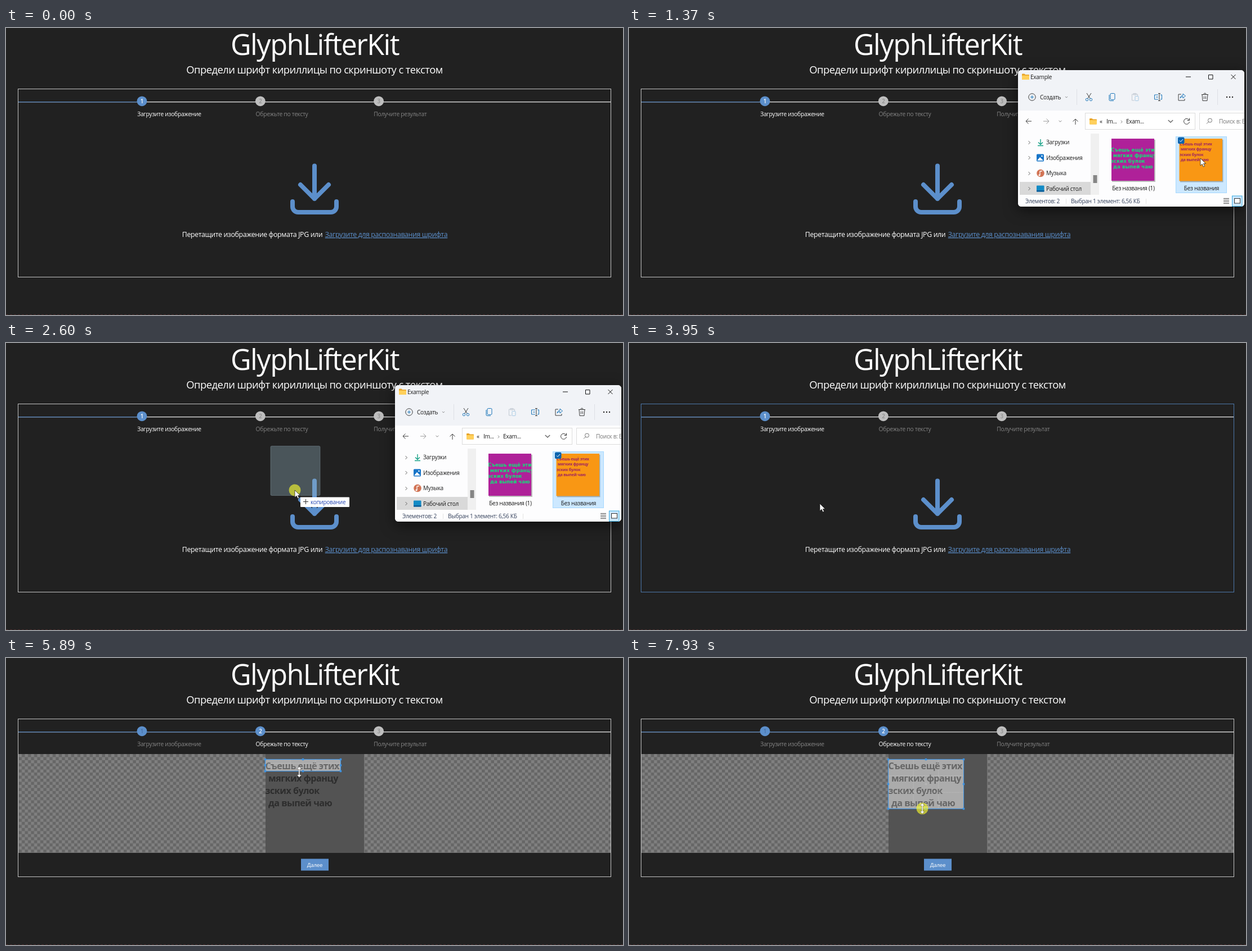
Write an HTML page that moves like this. It is 1096 by 511 pixels and loops after 8 s.

```html
<!DOCTYPE html>
<html lang="ru">
<head>
<meta charset="utf-8">
<title>Определение шрифта</title>
<style>
html, body { margin: 0; width: 100%; height: 100%; overflow: hidden; background: #212121; }
svg { display: block; width: 1096px; height: 511px; }
text { font-family: "Open Sans", "Noto Sans", sans-serif; letter-spacing: -.03em; }
.mid { text-anchor: middle; }
.label { font-size: 10.3px; }
.num { font-size: 9.8px; font-weight: 600; text-anchor: middle; }
.ui { font-size: 10.1px; fill: #1b1b1b; }
.line { fill: none; stroke: #3c3c3c; }
.blue { fill: none; stroke: #1874b8; }
.wide { font: bold 8.7px "DejaVu Sans", sans-serif; letter-spacing: 0; }
#win { filter: drop-shadow(0 6px 12px rgba(0,0,0,.55)); }
</style>
</head>
<body>
<svg viewBox="0 0 1096 511">
<defs>
  <pattern id="check" x="22.5" y="171" width="10.968" height="10.968" patternUnits="userSpaceOnUse">
    <path d="M0 0H10.968V10.968H0z" fill="#666"/>
    <path d="M0 0H5.484V10.968H10.968V5.484H0z" fill="#808080"/>
  </pattern>
  <clipPath id="winClip"><rect width="402" height="243" rx="6"/></clipPath>
  <clipPath id="picClip"><rect x="166" y="122" width="76" height="75"/></clipPath>
  <clipPath id="cropClip"><rect class="cropRect" x="460.5" y="180.5" width="134"/></clipPath>

  <g id="words" font-size="16.15" font-weight="700">
    <text x="460.5" y="198">Съешь ещё этих</text>
    <text x="466" y="220">мягких францу</text>
    <text x="460.5" y="242">зских булок</text>
    <text x="466" y="264">да выпей чаю</text>
  </g>

  <g id="folder">
    <path d="M0 1.5Q0 .5 1 .5H4.5L6 2H12Q13 2 13 3V10Q13 11 12 11H1Q0 11 0 10z" fill="#e8a427"/>
    <path d="M0 4.2Q0 3.4 1 3.4H12Q13 3.4 13 4.2V10Q13 11 12 11H1Q0 11 0 10z" fill="#ffd05b"/>
  </g>
  <path id="down" d="M-3-1.5 0 1.5 3-1.5" fill="none" stroke="#666"/>
  <path id="right" d="M-1.5-3 1.5 0-1.5 3" fill="none" stroke="#666"/>

  <g id="face" clip-path="url(#winClip)">
    <rect width="402" height="243" fill="#fdfdfe"/>
    <rect width="402" height="72" fill="#f1f3f7"/>
    <use href="#folder" x="7" y="6"/>
    <text class="ui" x="22" y="16">Example</text>
    <path class="line" style="stroke:#111" d="M298 12H307M338.5 8.5H346V16H338.5zM378.5 8 386.5 16M386.5 8 378.5 16"/>

    <!-- toolbar -->
    <g transform="translate(25 48)" class="line"><circle r="6.2"/><path class="blue" d="M-3 0H3M0-3V3"/></g>
    <text class="ui" x="39" y="52">Создать</text>
    <use href="#down" transform="translate(86 48) scale(.7)"/>
    <path d="M104.5 34V62M354.5 34V62" stroke="#dde0e6"/>
    <g transform="translate(126 48)" class="line"><path d="M-4-7 2.5 3M4-7-2.5 3"/><g class="blue"><circle cx="-3.5" cy="4.5" r="2.2"/><circle cx="3.5" cy="4.5" r="2.2"/></g></g>
    <g transform="translate(167 48)" class="blue"><rect x="-3" y="-6.5" width="8" height="11" rx="1.5"/><path d="M-5-4V5Q-5 6.5-3 6.5H3"/></g>
    <g transform="translate(208 48)" fill="none" stroke="#c3cad3"><path d="M-1 6H-5.5V-5H4.5V-2M-3-6.5H2V-4H-3z"/><rect x="0" y="-1.5" width="6" height="8" rx="1" stroke="#a9cbe5"/></g>
    <g transform="translate(249 48)" class="blue"><path d="M0-4H-6.5V4H0M4-4H6.5V4H4M-4 0H0"/><path class="line" d="M2-6.5V6.5M0-6.5H4M0 6.5H4"/></g>
    <g transform="translate(291 48)" class="blue"><path class="line" d="M-1-5H-6V6H5V3"/><path d="M-3 2Q-2-3 2-3V-6L6.5-2 2 2V-1Q-1-1-3 2z"/></g>
    <path transform="translate(332 48)" class="line" d="M-6-4.5H6M-2-4.5Q-2-7 0-7T2-4.5M-5-4.5-4 6.5H4L5-4.5M-1.5-1.5V3.5M1.5-1.5V3.5"/>
    <g fill="#222"><circle cx="371" cy="48" r="1.2"/><circle cx="376" cy="48" r="1.2"/><circle cx="381" cy="48" r="1.2"/></g>

    <!-- address row -->
    <path class="line" d="M24 91H14M18.5 86.5 14 91 18.5 95.5M102 97V87M97.5 91.5 102 87 106.5 91.5"/>
    <path fill="none" stroke="#999" d="M45 91H55M50.5 86.5 55 91 50.5 95.5"/>
    <use href="#down" transform="translate(75 91) scale(.8)"/>
    <g fill="#fff" stroke="#dcdcdc"><rect x="119.5" y="76.5" width="195" height="29"/><rect x="322.5" y="76.5" width="100" height="29"/></g>
    <use href="#folder" x="127" y="85.5"/>
    <text class="ui" x="145" y="94.5">«</text>
    <text class="ui" x="157" y="95">Im...</text>
    <use href="#right" transform="translate(184 92) scale(.8)"/>
    <text class="ui" x="192" y="95">Exam...</text>
    <use href="#down" transform="translate(271 91) scale(1.4)"/>
    <path class="line" d="M304 89A5 5 0 1 0 304.5 92M304.5 85.5V89.5H300.5"/>
    <g class="line" stroke-opacity=".7"><circle cx="341" cy="89.5" r="3.5"/><path d="M338.5 92 335 95.5"/></g>
    <text class="ui" x="357" y="95" style="fill:#777">Поиск в: Example</text>

    <!-- side list -->
    <rect x="3" y="199" width="126" height="23" fill="#d9d9d9"/>
    <use href="#right" x="20" y="129"/><use href="#right" x="20" y="156"/><use href="#right" x="20" y="184"/><use href="#right" x="20" y="211"/>
    <path d="M40 123V132M36 128.5 40 132.5 44 128.5M35 134.5H45" fill="none" stroke="#14a085" stroke-width="1.4"/>
    <rect x="33" y="149.5" width="13" height="13" rx="1.5" fill="#1775c8"/><path d="M34 161 39 155 45 161z" fill="#fff"/><circle cx="42.5" cy="153" r="1.3" fill="#fff"/>
    <circle cx="40" cy="183.5" r="6.8" fill="#d27455"/><path d="M39 187V180L43 179.5" fill="none" stroke="#fff" stroke-width="1.3"/><circle cx="38" cy="187" r="1.6" fill="#fff"/>
    <rect x="33" y="205.5" width="13.5" height="11" rx="1" fill="#138bc6"/><path d="M33 214H46.5V216.5H33z" fill="#0d5c98"/>
    <text class="ui" x="50" y="132">Загрузки</text>
    <text class="ui" x="50" y="159.5">Изображения</text>
    <text class="ui" x="50" y="187">Музыка</text>
    <text class="ui" x="50" y="214.5">Рабочий стол</text>
    <rect x="129" y="113" width="15" height="109" fill="#f0f0f0"/>
    <rect x="133.5" y="187" width="7" height="14" fill="#858585"/>

    <!-- files -->
    <rect x="167" y="124" width="77" height="75" fill="#bbb"/>
    <rect x="166" y="122" width="76" height="75" fill="#af2199"/>
    <g clip-path="url(#picClip)" fill="#12e178">
      <text class="wide" x="165" y="144.5">Съешь ещё этих</text>
      <text class="wide" x="169" y="154.5">мягких францу</text>
      <text class="wide" x="165" y="164.5">зских булок</text>
      <text class="wide" x="169" y="174.5">да выпей чаю</text>
    </g>
    <text class="ui mid" x="205" y="213.5">Без названия (1)</text>
    <rect x="280.5" y="118.5" width="90" height="100" fill="#cce8ff" stroke="#a5d8ff"/>
    <rect x="288" y="124" width="76.5" height="75.5" fill="#9ab0bd"/>
    <rect x="286.5" y="122" width="76.5" height="75.5" fill="#f99714"/>
    <g fill="#a0265f" font-size="7.1" font-weight="700">
      <text x="287" y="133.5">Съешь ещё этих</text>
      <text x="289" y="143">мягких францу</text>
      <text x="287" y="152.5">зских булок</text>
      <text x="289" y="162">да выпей чаю</text>
    </g>
    <rect x="284" y="119.5" width="11.5" height="11.5" rx="2" fill="#0b63ad"/>
    <path d="M287 125.5 289 127.5 293 123" fill="none" stroke="#fff"/>
    <text class="ui mid" x="326" y="213.5">Без названия</text>

    <!-- status row -->
    <rect y="222.5" width="402" height="21" fill="#fdfdfe"/>
    <text class="ui" x="13" y="237" style="fill:#35425c">Элементов: 2</text>
    <text class="ui" x="94" y="237" style="fill:#35425c">Выбран 1 элемент: 6,56 КБ</text>
    <path d="M85.5 229V238M227.5 229V238" stroke="#e3e3e3"/>
    <path d="M365 228.5H375M365 231.5H375M365 234.5H375M365 237.5H375" stroke="#444"/>
    <rect x="380.5" y="224" width="17.5" height="18.5" fill="#cce8ff" stroke="#39a9df"/>
    <rect x="384.5" y="228.5" width="10" height="8.5" fill="#fff" stroke="#333"/>
  </g>
</defs>

<rect width="1096" height="511" fill="#212121"/>
<path d="M0 510.5H1096" stroke="#4b2f2f" stroke-dasharray="4 3"/>
<g fill="#fff">
  <text class="mid" x="548.5" y="48" font-size="50.3">GlyphLifterKit</text>
  <text class="mid" x="548" y="81" font-size="18.4" font-weight="500">Определи шрифт кириллицы по скриншоту с текстом</text>
</g>

<g id="upload">
  <g fill="none" stroke="#5c8fcb" stroke-width="8" stroke-linecap="round" stroke-linejoin="round">
    <path d="M548 245.5V304M523 279 548 304 573 279"/>
    <path d="M509 309V318A10 10 0 0 0 519 328H577A10 10 0 0 0 587 318V309"/>
  </g>
  <g font-size="12.35" font-weight="500">
    <text class="mid" x="437.5" y="372" fill="#fff">Перетащите изображение формата JPG или</text>
    <text class="mid" x="675.5" y="372" fill="#5c8fcb" text-decoration="underline">Загрузите для распознавания шрифта</text>
  </g>
</g>

<g id="crop">
  <rect x="22" y="171" width="1052" height="176" fill="url(#check)"/>
  <rect x="461" y="171" width="175" height="176" fill="#535353"/>
  <use href="#words" fill="#2d2d2d"/>
  <g clip-path="url(#cropClip)">
    <rect x="460" y="171" width="176" height="176" fill="#ababab"/>
    <use href="#words" fill="#666"/>
  </g>
  <path id="thirds" fill="none" stroke="#eee" stroke-opacity=".4" stroke-width=".7" stroke-dasharray="1.5 1"/>
  <rect class="cropRect" x="460.5" y="180.5" width="134" fill="none" stroke="#3f92e0" stroke-width="1.1"/>
  <path id="knobs" fill="#3f92e0"/>
  <rect x="524" y="357.5" width="49" height="21" fill="#5c8fcb"/>
  <text class="mid" x="548.5" y="371.5" font-size="9.8" font-weight="500" fill="#fff">Далее</text>
</g>

<rect id="frame" x="21.5" y="108.5" width="1053" fill="none"/>
<rect x="22" y="131" width="1052" height="1.3" fill="#e6e6e6"/>
<rect id="bar" x="22" y="131" height="1.3" fill="#4f7bb0"/>
<g id="steps"></g>

<g id="preview">
  <rect x="400" y="364" width="175" height="134" rx="6" fill="#f1f3f7"/>
  <use href="#folder" x="412" y="373"/>
  <text class="ui" x="430" y="383">Example</text>
  <path class="line" d="M556 375 563 382M563 375 556 382"/>
  <use href="#face" transform="translate(412 394) scale(.376)"/>
</g>
<use id="win" href="#face"/>

<g id="ghost">
  <rect x="-43" y="-78.5" width="88" height="88" rx="2" fill="#96b4c3" fill-opacity=".35" stroke="#a5c0cc" stroke-opacity=".3"/>
  <g id="hint">
    <rect x="10" y="12.5" width="87" height="17.5" rx="1" fill="#fff"/>
    <path d="M15 20.5H24M19.5 16V25" stroke="#333"/>
    <text x="28" y="24.5" font-size="10.05" fill="#2748b4">копирование</text>
  </g>
</g>
<circle id="press" r="10.5" fill="#fcff2c" fill-opacity=".62"/>
<path id="arrow" d="M0 0V13L3.2 10.2 5.2 15 7.6 14 5.5 9.4H9.5z" fill="#fff" stroke="#111" stroke-width=".7"/>
<g id="cross" fill="none"><path d="M-9 0H9M0-9V9" stroke="#222" stroke-width="2.4" stroke-opacity=".5"/><path d="M-8.5 0H8.5M0-8.5V8.5" stroke="#fff" stroke-width="1.1"/></g>
<path id="resize" d="M0-9.5 4-5H1V5H4L0 9.5-4 5H-1V-5H-4z" fill="#fff" stroke="#222" stroke-width=".6" stroke-opacity=".6"/>
</svg>

<script>
const LOOP = 8000, BLUE = "#5c8fcb";
const $ = id => document.getElementById(id);
const set = (el, attrs) => { for (const k in attrs) el.setAttribute(k, attrs[k]); };
const show = (id, on) => { $(id).style.display = on ? "" : "none"; };
const place = (id, x, y, s = 1) => set($(id), { transform: `translate(${x} ${y}) scale(${s})` });
const mix = (a, b, p) => a + (b - a) * p;
const smooth = p => p * p * (3 - 2 * p);
const easeOut = p => 1 - (1 - p) ** 2;

// share of n even jumps done at time t, the first at a and the last at b
function jumps(t, a, b, n) {
  if (t < a) return 0;
  return Math.min(n, Math.floor((t - a) / (b - a) * (n - 1) + 1e-6) + 1) / n;
}

const steps = ["Загрузите изображение", "Обрежьте по тексту", "Получите результат"].map((name, i) => {
  const x = 241.5 + i * 210.3, mid = [290, 490, 700.3][i];
  const g = document.createElementNS("http://www.w3.org/2000/svg", "g");
  g.innerHTML = `<circle cx="${x}" cy="130.3" r="8.9"/>
    <text class="num" x="${x}" y="134">${i + 1}</text>
    <text class="label mid" x="${mid}" y="157">${name}</text>`;
  $("steps").append(g);
  return g.children;
});

function drawSteps(now) {
  steps.forEach(([dot, num, label], i) => {
    set(dot, { fill: i <= now ? BLUE : "#bebebe" });
    set(num, { fill: i === now ? "#fff" : i < now ? "#466fa5" : "#8d8d8d" });
    set(label, { fill: i === now ? "#fff" : "#848484" });
  });
  set($("bar"), { width: 211 + now * 210.3 });
}

function drawCrop(bottom) {
  const left = 460.5, right = 594.5, top = 180.5, w = right - left, h = bottom - top;
  const cx = left + w / 2, cy = top + h / 2;
  for (const el of document.querySelectorAll(".cropRect")) set(el, { height: h });
  let grid = `M${cx - 2} ${cy}h4M${cx} ${cy - 2}v4`;
  for (const k of [1 / 3, 2 / 3])
    grid += `M${left + w * k} ${top}v${h}M${left} ${top + h * k}h${w}`;
  set($("thirds"), { d: grid });
  let d = "";
  for (const x of [left, cx, right])
    for (const y of [top, cy, bottom])
      if (x !== cx || y !== cy) d += `M${x - 1.7} ${y - 1.7}h3.4v3.4h-3.4z`;
  set($("knobs"), { d });
}

function pointer(t) {
  if (t < 1910) {
    const p = easeOut(jumps(t, 820, 1370, 9));
    return [mix(440, 1015, p), mix(550, 232, p)];
  }
  if (t < 2930) {
    const p = jumps(t, 1910, 2600, 11);
    return [mix(1003, 513, smooth(p)), mix(240, 262, p) + 56 * p * (1 - p)];
  }
  if (t < 4280) {
    const p = smooth(jumps(t, 3670, 3950, 5));
    return [mix(513, 339, p), mix(262, 286, p)];
  }
  if (t < 5890) {
    const p = smooth(jumps(t, 4890, 5220, 6)), q = jumps(t, 5420, 5620, 4);
    return [mix(339, 540, p) - 19 * q, mix(286, 209, p) - 3 * q];
  }
  const p = jumps(t, 5890, 6100, 4);
  return [mix(520, 523.5, p), mix(204, 199.5, p)];
}

function draw(t) {
  const cropping = t >= 4280, dragging = t >= 1910 && t < 2930;
  const open = t >= 470 && t < 2930;
  let [x, y] = pointer(t);

  const pull = smooth(jumps(t, 6570, 7330, 12));
  const bottom = 201.5 + 62 * pull + (t >= 7400 ? 1.5 : 0) + 3.5 * jumps(t, 7860, 7930, 2);
  if (t >= 6570) {
    x = mix(523.5, 521, pull);
    y = bottom - 2 + 1.5 * pull;
  }

  show("upload", !cropping);
  show("crop", cropping);
  drawSteps(cropping ? 1 : 0);
  if (cropping) drawCrop(bottom);

  const overWin = open && x > 691 && y < 318;
  const hover = t >= 820 && !cropping && !dragging && !overWin && y < 444;
  set($("frame"), { height: cropping ? 281 : 335, stroke: hover ? "#4d78ab" : "#c4c4c4" });

  show("preview", t >= 200 && t < 320);
  show("win", open);
  const grow = 1 - (1 - Math.max(0, (jumps(t, 470, 680, 4) * 4 - 1) / 3)) ** 3;
  place("win", mix(627, 691, grow), mix(207, 75, grow), mix(.696, 1, grow));

  show("ghost", dragging);
  show("hint", x < 691);
  place("ghost", x, y);
  show("press", (t >= 1710 && t < 2930) || t >= 6370);
  show("arrow", t >= 820 && !cropping);
  show("cross", cropping && t < 5890);
  show("resize", t >= 5890);
  for (const id of ["press", "arrow", "cross", "resize"]) place(id, x, y);
}

function tick() {
  draw(performance.now() % LOOP);
  requestAnimationFrame(tick);
}
tick();
</script>
</body>
</html>
```
